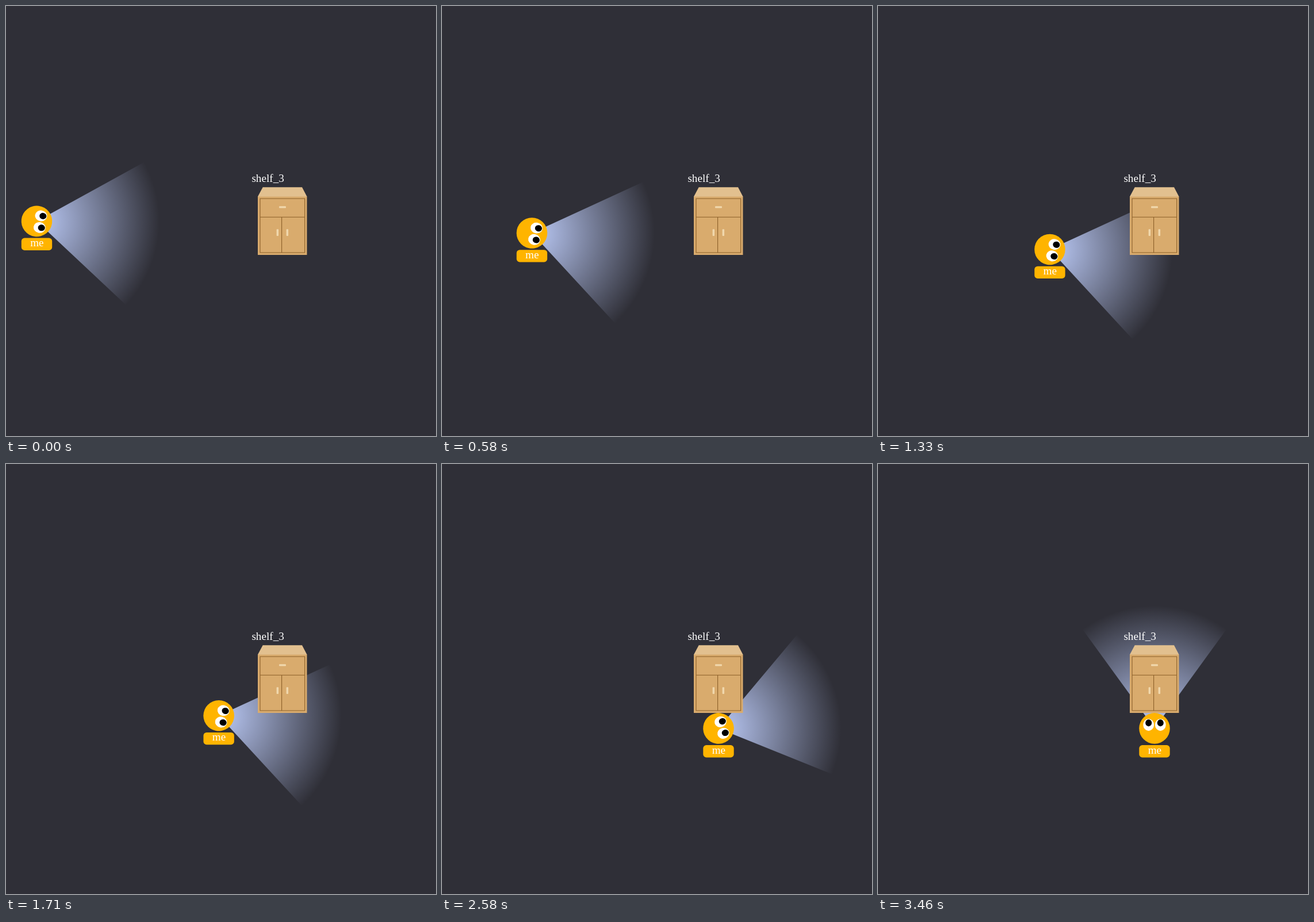
These frames come from a looping animation (748x748 px, 3750 ms). An HTML page with a canvas:

```html
<!DOCTYPE html>
<html>
<head>
<meta charset="utf-8">
<style>
  html, body { margin: 0; width: 100%; height: 100%; overflow: hidden; background: #2f2f37; }
  canvas { display: block; }
</style>
</head>
<body>
<canvas width="748" height="748"></canvas>
<script>
const ctx = document.querySelector('canvas').getContext('2d');
const LOOP = 3750, TICK = 125 / 3, LAST_TICK = 83;
const WALK_START = 1, WALK_END = 55;
const from = { x: 53.5, y: 374.4 }, to = { x: 481, y: 459.9 };
const walkAngle = Math.atan2(to.y - from.y, to.x - from.x);
const rad = Math.PI / 180;

function shape(color, build) {
  ctx.fillStyle = color;
  ctx.beginPath();
  build();
  ctx.fill();
}

function ellipse(color, x, y, rx, ry = rx) {
  shape(color, () => ctx.ellipse(x, y, rx, ry, 0, 0, 2 * Math.PI));
}

function text(str, x, y, align) {
  ctx.font = '19.2px "Liberation Serif", "Times New Roman", serif';
  ctx.textAlign = align;
  ctx.fillStyle = '#fff';
  ctx.fillText(str, x, y);
}

function pose(n) {
  const k = Math.min(1, Math.max(0, (n - WALK_START) / (WALK_END - WALK_START)));
  let angle = Math.min(walkAngle, (7.2 + 3.6 * n) * rad);
  if (n > WALK_END) {
    const turn = (n - WALK_END) / (LAST_TICK - WALK_END);
    angle = walkAngle + (-Math.PI / 2 - walkAngle) * turn;
  }
  return { x: from.x + (to.x - from.x) * k, y: from.y + (to.y - from.y) * k, angle };
}

function drawWalker({ x, y, angle }) {
  ctx.save();
  ctx.translate(x, y);
  ctx.save();
  ctx.rotate(angle);
  const light = ctx.createRadialGradient(0, 0, 0, 0, 0, 213.5);
  light.addColorStop(0, 'rgba(188,203,248,1)');
  light.addColorStop(1, 'rgba(188,203,248,0)');
  shape(light, () => {
    ctx.moveTo(0, 0);
    ctx.arc(0, 0, 213.5, -36 * rad, 36 * rad);
  });
  ellipse('#ffb400', 0, 0, 26.8);
  for (const side of [-10.3, 10.3]) {
    ellipse('#fff', 6.2, side, 10.5, 9.4);
    ellipse('#000', 9.6, side, 6.1, 5.5);
  }
  ctx.restore();
  shape('#ffb400', () => ctx.roundRect(-26.7, 29.2, 53.4, 21.3, 5.5));
  text('me', 0.4, 43.6, 'center');
  ctx.restore();
}

function drawShelf() {
  shape('#d9ab6d', () => ctx.rect(438, 331, 85.5, 102));
  shape('#e2c08f', () => {
    ctx.moveTo(446.7, 315.3);
    ctx.lineTo(515, 315.3);
    ctx.lineTo(523.5, 331.4);
    ctx.lineTo(438, 331.4);
  });
  ctx.strokeStyle = '#8c6029';
  ctx.lineWidth = 1.1;
  ctx.beginPath();
  ctx.rect(442, 335, 77.7, 94);
  ctx.moveTo(442, 367.3);
  ctx.lineTo(519.7, 367.3);
  ctx.moveTo(479.6, 367.3);
  ctx.lineTo(479.6, 429);
  ctx.stroke();
  const handle = (x, y, w, h) => shape('#f0d7ac', () => ctx.roundRect(x, y, w, h, 1));
  handle(475, 348.2, 12, 3.4);
  handle(470.6, 388.3, 3.5, 11.8);
  handle(487.6, 388.3, 3.5, 11.8);
  text('shelf_3', 427.4, 306, 'left');
}

function draw(now) {
  // The motion advances in 24 steps per second, then rests until the loop ends.
  const n = Math.min(LAST_TICK, Math.floor((now % LOOP + 4.9) / TICK));
  ctx.fillStyle = '#2f2f37';
  ctx.fillRect(0, 0, 748, 748);
  drawWalker(pose(n));
  drawShelf();
}

const start = performance.now();
function loop() {
  draw(performance.now() - start);
  requestAnimationFrame(loop);
}
loop();
</script>
</body>
</html>
```
